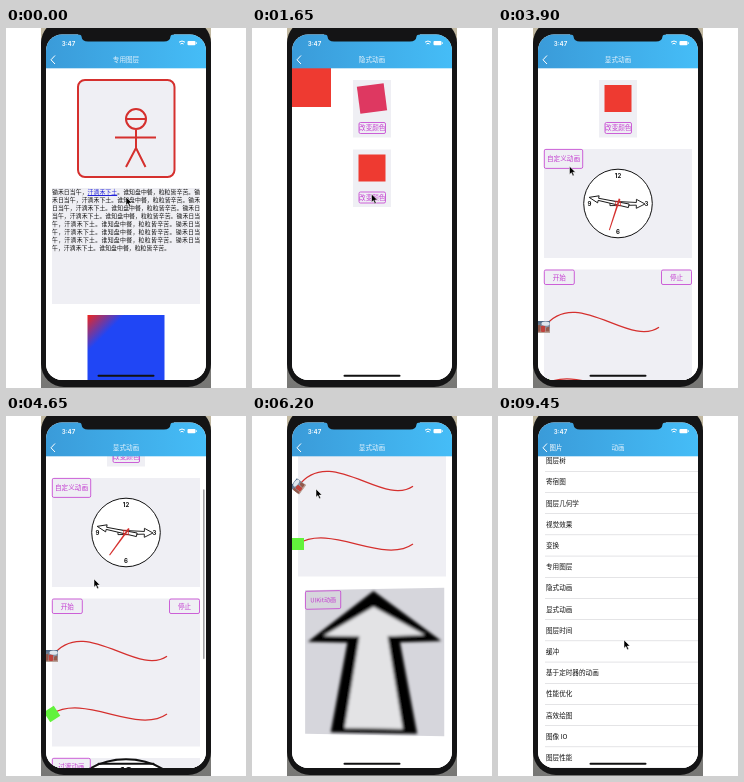
An HTML page that plays this animation: 240 by 360 pixels, repeating every 9500 ms.

```html
<!DOCTYPE html>
<html lang="zh-CN">
<head>
<meta charset="utf-8">
<title>动画</title>
<style>
html,body{margin:0;width:100%;height:100%;overflow:hidden;background:#fff}
svg{display:block;width:100%;height:100%}
text,.verse{font-family:"Noto Sans CJK SC","Noto Sans CJK",sans-serif}
.en{font-family:Inter,Roboto,sans-serif}
.verse{font-size:5.92px;line-height:8px;color:#111;text-align:justify;width:148.2px}
.verse u{color:#2222d8}
</style>
</head>
<body>
<svg id="stage" viewBox="0 0 240 360" xmlns="http://www.w3.org/2000/svg"></svg>
<script>
const LOOP = 9500, SLIDE = 120;
const RED = '#ee3a31', PANEL = '#efeff4', PINK = '#c33bd0', LINE = '#d5302e';
const clamp = v => Math.max(0, Math.min(1, v));
const span = (t, a, b) => clamp((t - a) / (b - a));
const ease = p => (1 - Math.cos(Math.PI * p)) / 2;
const mix = (a, b, p) => a + (b - a) * p;

// Drawing helpers
const rect = (x, y, w, h, fill, more = '') =>
  `<rect x="${x}" y="${y}" width="${w}" height="${h}" fill="${fill}" ${more}/>`;
const text = (s, x, y, size = 6.6, fill = '#111', more = '') =>
  `<text x="${x}" y="${y + size * .37}" font-size="${size}" fill="${fill}" ${more}>${s}</text>`;
const mid = 'text-anchor="middle"';
const path = (d, stroke, w, more = '') =>
  `<path d="${d}" fill="none" stroke="${stroke}" stroke-width="${w}" ${more}/>`;
const button = (s, x, y, w, h, size = 6.6) =>
  rect(x, y, w, h, 'none', `rx="1.5" stroke="${PINK}" stroke-width=".8"`) +
  text(s, x + w / 2, y + h / 2, size, PINK, mid);
const group = (id, body, more = '') => `<g id="${id}" ${more}>${body}</g>`;

const card = (y, id) => rect(101, y, 38, 57.5, PANEL) +
  rect(106.5, y + 5, 27, 27, RED, `id="${id}"`) + button('改变颜色', 107, y + 42.5, 26.5, 11);

// Wavy tracks: shared x controls, individual y controls
const wave = (y, a, b) => ({
  d: `M46 ${y}c32 ${a} 85 ${b} 115 0`,
  at(p) {
    const q = 1 - p, k1 = 3 * q * q * p, k2 = 3 * q * p * p;
    const dx = q * q * 32 + 2 * q * p * 53 + p * p * 30;
    const dy = q * q * a + 2 * q * p * (b - a) - p * p * b;
    return [46 + k1 * 32 + k2 * 85 + p ** 3 * 115, y + k1 * a + k2 * b,
      Math.atan2(dy, dx) * 180 / Math.PI];
  }
});
const waveA = wave(299.3, -42.5, 21), waveB = wave(357, -21, 21), waveC = wave(236.7, -21, 42.5);

const picture = (x, y, w, h) => `<svg x="${x}" y="${y}" width="${w}" height="${h}" viewBox="0 0 38 77" preserveAspectRatio="none">
  <rect width="38" height="77" fill="url(#night)"/><circle cx="24" cy="17" r="13" fill="#dfe6ee"/>
  <path d="M0 63L38 59V77H0Z" fill="#b9a298"/><path d="M0 27L8 23V69H0ZM26 42L36 35V67H24Z" fill="#93594c"/>
  <rect x="9" y="31" width="14" height="39" rx="5" fill="#c0423c"/></svg>`;
const thumb = id => group(id, picture(-6, -6, 12, 12));

const hand = (len, back, w) =>
  `M${-w * .5} ${back}L${-w * .3} ${-len * .68}H${-w}L0 ${-len}L${w} ${-len * .68}H${w * .3}L${w * .5} ${back}Z`;
const dial = (cx, cy, k, id) => {
  const nums = [['12', 0, -28], ['3', 28.5, .5], ['6', 0, 28.5], ['9', -28.5, .5]];
  const arm = (a, d) => `<path d="${d}" transform="rotate(${a})" fill="#fff" stroke="#111" stroke-width=".9"/>`;
  return `<g transform="translate(${cx} ${cy}) scale(${k})"><circle r="34.3" fill="#fff" stroke="#111" stroke-width="1"/>` +
    nums.map(n => text(n[0], n[1], n[2], 6, '#111', `class="en" font-weight="700" ${mid}`)).join('') +
    arm(91, hand(27, 8, 4.5)) + arm(282, hand(29.5, 11, 3.6)) +
    rect(-2.3, -2.3, 4.6, 4.6, 'none', `stroke="${LINE}" stroke-width=".8"`) +
    `<path id="${id}" d="M-.9 5L-.5 -28H.5L.9 5Z" fill="${LINE}"/></g>`;
};

// Pages
const poem = '锄禾日当午，汗滴禾下土。谁知盘中餐，粒粒皆辛苦。';
const verse = poem.replace('汗滴禾下土', '<u>$&</u>') + poem.repeat(7);
const layersPage = () =>
  rect(72, 52, 96.5, 97, PANEL, `rx="7" stroke="${LINE}" stroke-width="2"`) +
  path('M140 91A10 10 0 1 1 120 91A10 10 0 1 1 140 91H120M130 101V120L120 139M130 120L139.5 139M109 109.5H150', LINE, 2, 'stroke-linejoin="round"') +
  rect(46, 160, 148, 116, PANEL) +
  `<foreignObject x="46" y="160" width="149" height="68"><div xmlns="http://www.w3.org/1999/xhtml" class="verse">${verse}</div></foreignObject>` +
  rect(81.5, 287, 77, 77, 'url(#fade)');
const implicitPage = () => rect(40, 40, 39, 39, RED) + card(52, 'boxA') + card(121.5, 'boxB');
const explicitPage = () => group('scroll',
  card(52, 'boxC') +
  rect(46, 121, 148, 109, PANEL) + button('自定义动画', 46.3, 121.4, 38.4, 19) + dial(120, 175.5, 1, 'second') +
  rect(46, 241.5, 148, 148, PANEL) + button('开始', 46.3, 242, 30, 14.5) + button('停止', 163.5, 242, 30, 14.5) +
  path(waveA.d, LINE, 1.3) + path(waveB.d, LINE, 1.3) + thumb('sled') +
  group('green', rect(-6, -6, 12, 12, '#62f23c')) +
  group('front', rect(-74, -74, 148, 148, PANEL) + dial(0, 0, 2.12, 'second2') + button('过渡动画', -73.7, -73.7, 38, 17)) +
  group('back', `<path id="sheet"/>
    <g filter="url(#soft)"><path id="outer" fill="#050505"/><path id="inner" fill="#e3e3e5"/></g>` +
    group('flipBtn', button('UIKit动画', -73.7, -73, 37, 18, 6.3)))) +
  rect(197, 0, 1.6, 170, '#8c8c90', 'id="bar" rx=".8"');
const slider = (y, id) =>
  path(`M53 ${y}H84`, '#c5c5ca', 1) + path('', '#3f9ede', 1, `id="${id}Fill"`) +
  `<circle id="${id}Knob" cy="${y}" r="5.5" fill="#fff" stroke="#ccc" stroke-width=".4" filter="url(#drop)"/>` +
  text('', 94, y, 6.5, '#111', `class="en" id="${id}Text"`);
const timePage = () =>
  rect(46, 52.5, 148, 114, PANEL) + picture(100.7, 70, 38.4, 77) +
  rect(46, 179.5, 148, 147.5, PANEL) + path(waveC.d, LINE, 1.3) + thumb('rider') +
  slider(291.5, 'speed') + slider(308.7, 'offset') +
  group('play', button('PLAY', 174.7, 313.8, 16, 8, 5.6), 'opacity=".6"');
const listPage = () =>
  '图层树 寄宿图 图层几何学 视觉效果 变换 专用图层 隐式动画 显式动画 图层时间 缓冲 基于定时器的动画 性能优化 高效绘图 图像_IO 图层性能'
    .split(' ').map((s, i) => text(s.replace('_', ' '), 48, 44.7 + i * 21.2) +
      rect(47, 55 + i * 21.2, 153, .5, '#c8c8cc')).join('');

const pages = {
  layers: ['专用图层', layersPage], list: ['动画', listPage], implicit: ['隐式动画', implicitPage],
  explicit: ['显式动画', explicitPage], time: ['图层时间', timePage]
};
const names = Object.keys(pages);
const moves = [[500, 'list', -1], [750, 'implicit', 1], [1950, 'list', -1], [2300, 'explicit', 1],
  [6650, 'list', -1], [6950, 'time', 1], [9050, 'list', -1]];
const pointer = [[0, 120, 169], [200, 120, 169], [400, 46, 30], [500, 46, 30], [700, 110, 170], [800, 110, 170],
  [1150, 120, 98], [1420, 120, 98], [1600, 119.5, 166], [1720, 119.5, 166], [1900, 46, 30], [1970, 46, 30],
  [2220, 110, 191], [2350, 110, 191], [2750, 126, 100], [3100, 126, 100], [3400, 66, 130], [3700, 66, 130],
  [4300, 88, 163], [4700, 88, 163], [5050, 61, 189], [5250, 61, 189], [5850, 70, 183], [6030, 70, 183],
  [6180, 64, 73], [6350, 64, 73], [6580, 46, 30], [6680, 46, 30], [6880, 110, 212], [6980, 110, 212],
  [7300, 60, 291], [7500, 84, 291], [7600, 60, 308], [7800, 84, 308], [7960, 182, 315], [8700, 182, 315],
  [9000, 46, 30], [9080, 46, 30], [9400, 126, 224], [9500, 126, 224]];

document.getElementById('stage').innerHTML = `<defs>
  <linearGradient id="sky"><stop stop-color="#3a9bd9"/><stop offset="1" stop-color="#45bdf7"/></linearGradient>
  <linearGradient id="desk" x2="0" y2="1"><stop stop-color="#c2b9a2"/><stop offset="1" stop-color="#777775"/></linearGradient>
  <linearGradient id="fade" x2="1" y2="1"><stop stop-color="#f0251c"/><stop offset=".24" stop-color="#2046f5"/><stop offset="1" stop-color="#2046f5"/></linearGradient>
  <linearGradient id="night" x2="0" y2="1"><stop stop-color="#4d6684"/><stop offset=".6" stop-color="#93a3b3"/><stop offset="1" stop-color="#d6cbc5"/></linearGradient>
  <filter id="soft" x="-20%" y="-20%" width="140%" height="140%"><feGaussianBlur stdDeviation="1.4"/></filter>
  <filter id="drop" x="-40%" y="-40%" width="180%" height="200%"><feDropShadow dx="0" dy="1" stdDeviation=".8" flood-opacity=".25"/></filter>
  <clipPath id="screen"><rect x="40" y="6.5" width="160" height="345.5" rx="16"/></clipPath>
  <clipPath id="view"><rect x="40" y="40" width="160" height="312"/></clipPath></defs>` +
  rect(35, 0, 170, 360, 'url(#desk)') + rect(35, -8, 170, 367, '#141415', 'rx="23"') +
  group('glass', rect(40, 4, 160, 348, '#fff') +
    group('content', names.map(n => group(n, rect(40, 40, 160, 312, '#fff') + pages[n][1]())).join(''), 'clip-path="url(#view)"') +
    rect(40, 4, 160, 36.3, 'url(#sky)') +
    path('M49 27.5L45 31.8L49 36', '#fff', 1) + text('图片', 51.5, 32, 6.4, '#fff', 'id="backText"') +
    names.map(n => text(pages[n][0], 120, 32, 6.6, '#e6f3fc', `id="${n}Title" ${mid}`)).join('') +
    text('3:47', 62.5, 15.3, 6.2, '#fff', `class="en" font-weight="600" ${mid}`) +
    path('M173 14.2Q176 11.8 179 14.2M174.4 16Q176 14.7 177.6 16', '#fff', 1) +
    rect(181.5, 13, 8, 4.2, '#fff', 'rx="1"') + rect(190, 14.3, .8, 1.6, '#fff') +
    rect(91.5, 346.7, 57, 2, '#111', 'rx="1"'), 'clip-path="url(#screen)"') +
  '<path d="M72 0V6.5Q75.5 6.7 75.5 8.5Q76 13.6 82 13.6H158Q164 13.6 164.5 8.5Q164.5 6.7 168 6.5V0Z" fill="#141415"/>' +
  '<path id="cursor" d="M0 0V8.2L1.9 6.5L3.3 9.7L4.7 9.1L3.3 6H6Z" fill="#000" stroke="#fff" stroke-width=".5"/>';

const el = {};
document.querySelectorAll('[id]').forEach(e => el[e.id] = e);
const set = (id, key, v) => el[id].setAttribute(key, v);
const put = (id, x, y, a = 0) => set(id, 'transform', `translate(${x} ${y}) rotate(${a})`);
const show = (id, on) => set(id, 'display', on ? 'inline' : 'none');

function navigate(t) {
  let now = 'layers', prev = 'layers', dir = 1, p = 1;
  for (const [at, to, way] of moves) if (t >= at) {
    prev = now; now = to; dir = way; p = ease(span(t, at, at + SLIDE));
  }
  const moving = p < 1;
  for (const n of names) {
    show(n, n === now || moving && n === prev);
    set(n + 'Title', 'opacity', n === now ? p : n === prev ? 1 - p : 0);
  }
  if (prev !== now) put(prev, dir > 0 ? -48 * p : 160 * p, 0);
  put(now, dir > 0 ? 160 * (1 - p) : -48 * (1 - p), 0);
  el.content.appendChild(el[dir > 0 ? now : prev]);
  set('backText', 'opacity', now === 'list' ? p : prev === 'list' ? 1 - p : 0);
}

// Half-turn of the last panel, with the arrow sheet on its far side
const mirror = half => [...half, ...half.map(([u, v]) => [-u, v]).reverse()];
const arrowOut = mirror([[0, -72], [71, -21], [28, -20], [46, 72]]);
const arrowIn = mirror([[0, -56], [54, -27], [15, -26], [31, 67.5]]);
function flip(t) {
  const deg = 180 * (1 - ease(span(t, 6002, 6250))), r = deg * Math.PI / 180;
  const c = Math.cos(r), s = Math.sin(r), done = deg < 90;
  show('front', !done); show('back', done);
  set('front', 'transform', `translate(120 475) scale(${Math.abs(c)} 1)`);
  const at = (u, v) => {
    const k = (1 - .05 * s) / (1 - u * s / 1300);
    return [120 + 5 * s + u * c * k, 475 + v * k];
  };
  const poly = pts => 'M' + pts.map(p => at(...p).map(n => n.toFixed(2))).join('L') + 'Z';
  const shade = Math.round(mix(239, 212, clamp(s / .33)));
  set('sheet', 'd', poly([[-74, -74], [74, -74], [74, 74], [-74, 74]]));
  set('sheet', 'fill', `rgb(${shade},${shade},${shade + 6})`);
  set('outer', 'd', poly(arrowOut));
  set('inner', 'd', poly(arrowIn));
  const o = at(-74, -74);
  set('flipBtn', 'transform', `translate(${o[0]} ${o[1]}) skewY(${-4 * s}) scale(${c} 1) translate(74 74)`);
}

function slide(id, label, y, v) {
  const x = mix(58, 84, v);
  set(id + 'Fill', 'd', `M53 ${y}H${x}`);
  set(id + 'Knob', 'cx', x);
  el[id + 'Text'].textContent = `${label} ${v.toFixed(2)}`;
}

function render(t) {
  navigate(t);

  set('boxA', 'fill', t < 1410 ? RED : '#de3861');
  set('boxA', 'transform', `rotate(${90 * ease(span(t, 1440, 1698))} 120 70.5)`);

  const y = 59 * ease(span(t, 4400, 4640)) + 170 * ease(span(t, 5300, 5600));
  put('scroll', 0, -y);
  set('bar', 'y', 41 + y * .545);
  set('bar', 'opacity', .8 * (span(t, 4400, 4430) - span(t, 4750, 4850) + span(t, 5300, 5330) - span(t, 5700, 5800)));
  const sec = 6 * (30 + Math.floor((t - 3000) / 250));
  set('second', 'transform', `rotate(${sec})`);
  set('second2', 'transform', `rotate(${sec})`);
  if (t >= 5200) put('sled', ...waveA.at(t < 6200 ? (t - 5200) / 1000 : 0));
  else put('sled', 46, 299);
  const g = t < 4650 ? span(t, 2760, 3760) : span(t, 4650, 5650);
  if (g < 1 && t > 2760) put('green', ...waveB.at(g));
  else put('green', 46, 357);
  flip(t);

  slide('speed', 'speed', 291.5, span(t, 7300, 7500));
  slide('offset', 'timeOffset', 308.7, span(t, 7600, 7800));
  const r = span(t, 8020, 9020);
  if (r > 0 && r < 1) put('rider', ...waveC.at(r));
  else put('rider', 46, 236.5);

  let i = 1;
  while (i < pointer.length - 1 && pointer[i][0] < t) i++;
  const [a, b] = [pointer[i - 1], pointer[i]], p = ease(span(t, a[0], b[0]));
  put('cursor', mix(a[1], b[1], p), mix(a[2], b[2], p));
}

const start = performance.now();
function tick() {
  const t = (performance.now() - start) % LOOP;
  render(Math.floor(t / 50) * 50);
  requestAnimationFrame(tick);
}
tick();
</script>
</body>
</html>
```
